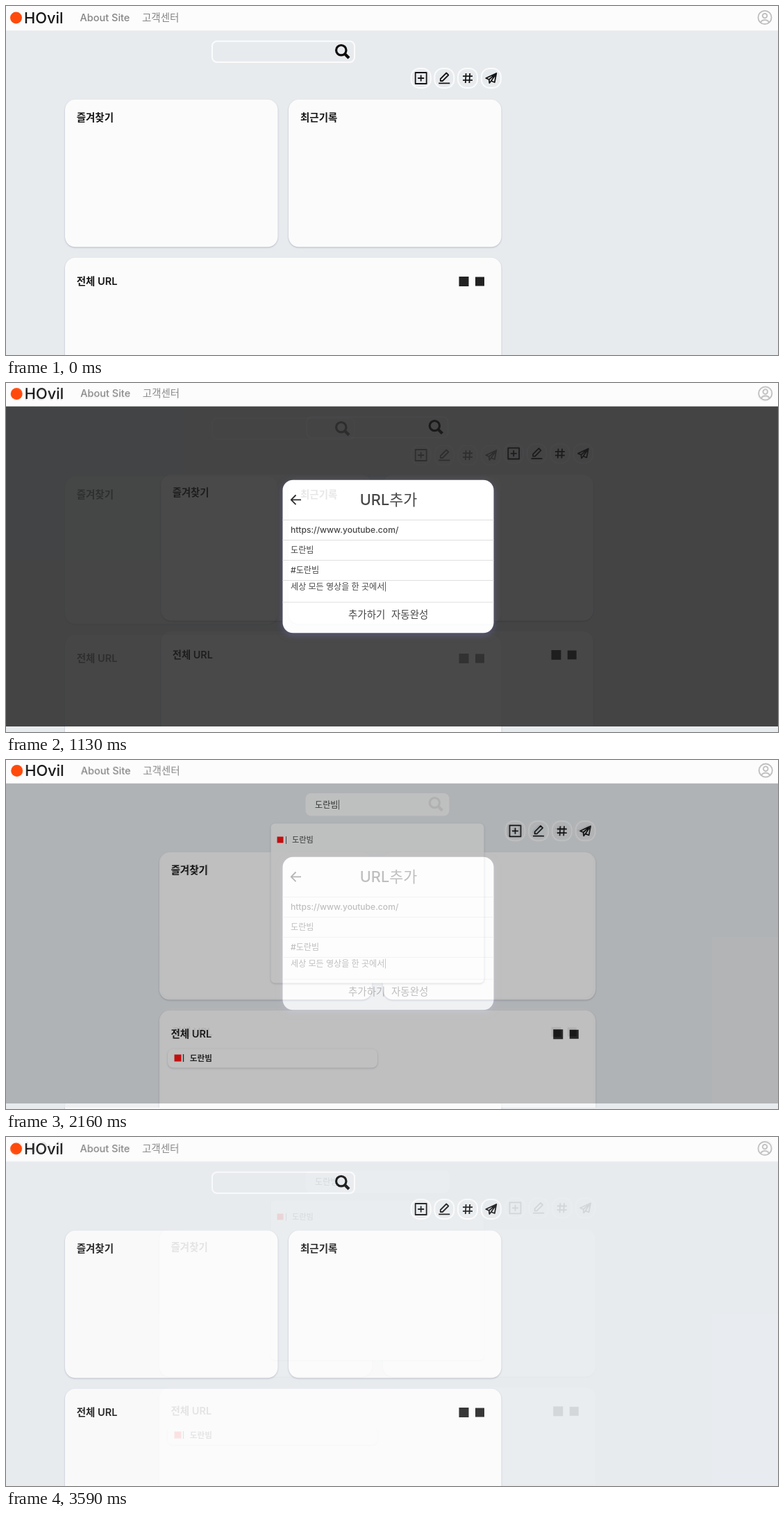
Write an HTML page that moves like this. It is 1112 px wide and 503 px high and loops after 3.69 s.

```html
<!DOCTYPE html>
<html lang="ko">
<head>
<meta charset="utf-8">
<title>URL board</title>
<style>
  html, body { margin: 0; height: 100%; overflow: hidden; background: #e8ebee; }
  svg { display: block; }
  .stage { width: 100vw; height: 100vh; }
  text { font: 500 14.5px Inter, "Noto Sans CJK KR", "Noto Sans CJK JP", sans-serif; fill: #333; }
  .nav { fill: #868686; }
  .logo { font-size: 21.8px; fill: #161616; }
  .head { font-weight: 600; fill: #151515; }
  .title { font-size: 21.8px; }
  .field { font-size: 12.1px; }
  .item { font-size: 11.7px; font-weight: 600; fill: #222; }
  .hint { font-size: 11.2px; }
  .line { fill: none; stroke: #151515; stroke-width: 1.8; stroke-linejoin: round; }
  .user { fill: none; stroke: #bdbdbd; stroke-width: 1.8; }
  .ring { fill: none; stroke: #fbfbfb; stroke-width: 2; }
  .rule { stroke: #dcdcdc; }
  .caret { stroke: #555; }
  .card { fill: #fbfbfb; filter: drop-shadow(0 1.6px 1px rgba(80, 90, 120, .35)); }
  .drop { fill: #fdfdfd; filter: drop-shadow(0 1px 1.5px rgba(80, 90, 120, .3)); }
  .modal { fill: #fff; filter: drop-shadow(0 3px 5px rgba(90, 90, 165, .5)); }

  /* Each slide holds 330 ms, then blends in ten 100 ms steps. */
  .form { animation: form 3690ms infinite; }
  .results { animation: results 3690ms infinite; }
  @keyframes form {
    0% { opacity: 0; animation-timing-function: step-end; }
    8.92% { opacity: 0; animation-timing-function: steps(10, start); }
    36.02% { opacity: 1; animation-timing-function: step-end; }
    70%, 100% { opacity: 0; animation-timing-function: step-end; }
  }
  @keyframes results {
    0% { opacity: 0; animation-timing-function: step-end; }
    42.26% { opacity: 0; animation-timing-function: steps(10, start); }
    69.36% { opacity: 1; animation-timing-function: step-end; }
    75.59% { opacity: 1; animation-timing-function: steps(9, start); }
    100% { opacity: .1; }
  }
</style>
</head>
<body>
<svg class="stage" viewBox="0 0 1112 503">
  <defs>
    <g id="nav">
      <rect x="-5" y="-5" width="1125" height="40.3" fill="#fcfcfc"/>
      <circle cx="14.5" cy="17" r="8.5" fill="#ff4a0c"/>
      <text class="logo" x="26" y="24.5">HOvil</text>
      <text class="nav" x="106.5" y="22">About Site</text>
      <text class="nav" x="196" y="22">고객센터</text>
      <g class="user" transform="translate(1093 16.5)">
        <circle r="9.6"/>
        <circle cy="-2.4" r="3.3"/>
        <path d="M-6 7.2Q-4.5 3.6 0 3.6T6 7.2"/>
      </g>
    </g>

    <g id="search">
      <rect class="ring" x="297" y="50.7" width="205" height="30.3" rx="7"/>
      <g fill="none" stroke="#0c0c0c">
        <circle cx="482.8" cy="63.7" r="7.2" stroke-width="3.2"/>
        <path d="M488 69l6 6" stroke-width="4.2"/>
      </g>
    </g>

    <rect id="ring" class="ring" x="-14" y="-14" width="28" height="28" rx="12"/>

    <g id="board">
      <g transform="translate(597.7 104)">
        <use href="#ring"/>
        <path class="line" d="M-8-8H8V8H-8ZM0-4.5V4.5M-4.5 0H4.5"/>
      </g>
      <g transform="translate(631.3 104)">
        <use href="#ring"/>
        <path class="line" d="M-5.5 4V1L3-7.5L6-4.5L-2.5 4ZM-8 7.3H8"/>
      </g>
      <g transform="translate(665 104)">
        <use href="#ring"/>
        <path class="line" d="M-2.4-7L-3.2 7M3.2-7L2.4 7M-7-2.8H7M-7 2.8H7"/>
      </g>
      <g transform="translate(698.8 104)">
        <use href="#ring"/>
        <path class="line" d="M7.5-7L-7.5 0L-3 2L-2.5 7L0 4L5 6ZM7.5-7L-3 2M7.5-7L0 4"/>
      </g>
      <rect class="card" x="85" y="134.8" width="306.5" height="212.5" rx="15"/>
      <rect class="card" x="407" y="134.8" width="306.5" height="212.5" rx="15"/>
      <rect class="card" x="85" y="362.7" width="628.5" height="212" rx="15"/>
      <text class="head" x="101.7" y="166">즐겨찾기</text>
      <text class="head" x="424" y="166">최근기록</text>
      <text class="head" x="101.7" y="402">전체 URL</text>
      <rect x="652.5" y="390" width="14" height="14" fill="#222"/>
      <rect x="676" y="390.5" width="13" height="13" fill="#222"/>
    </g>
  </defs>

  <g>
    <rect width="1112" height="503" fill="#e8ebee"/>
    <use href="#nav"/>
    <use href="#search"/>
    <use href="#board"/>
  </g>

  <g class="form">
    <svg width="1112" height="494.5">
      <rect width="1112" height="503" fill="#e8ebee"/>
      <g transform="translate(138.9 -1.5) scale(.991)">
        <use href="#search"/>
        <use href="#board"/>
      </g>
      <rect width="1112" height="503" fill="#000" opacity=".79"/>
      <use href="#nav" transform="translate(.8 -1.6)"/>
      <rect class="modal" x="398.5" y="139.7" width="304" height="220.6" rx="15"/>
      <path class="line" d="M425 168.3H411M417.5 161.5L410.7 168.3L417.5 175.1"/>
      <text class="title" x="551" y="176" text-anchor="middle">URL추가</text>
      <path class="rule" d="M398.5 197.5h304m-304 29h304m-304 29h304m-304 29h304m-304 31.5h304"/>
      <text class="field" x="410" y="216.3">https://www.youtube.com/</text>
      <text class="field" x="410" y="244.8">도란빔</text>
      <text class="field" x="410" y="273.8">#도란빔</text>
      <text class="field" x="410" y="297.8">세상 모든 영상을 한 곳에서</text>
      <path class="caret" d="M546.5 286.5v14"/>
      <text x="493" y="339.3">추가하기</text>
      <text x="555" y="339.3">자동완성</text>
    </svg>
  </g>

  <g class="results">
    <svg width="1112" height="501">
      <rect width="1112" height="503" fill="#e8ebee"/>
      <use href="#nav" transform="translate(1.4 -1.4)"/>
      <use href="#board" transform="translate(135.8 -1.7)"/>
      <rect x="431.5" y="48" width="207" height="32.5" rx="8" fill="#fdfdfd"/>
      <text class="field" x="445" y="69">도란빔</text>
      <path class="caret" d="M479.5 57.5v14"/>
      <rect class="drop" x="381.5" y="91.5" width="307" height="230" rx="6"/>
      <rect x="390.5" y="110.5" width="9" height="9" fill="#f00"/>
      <path class="caret" d="M403.5 110v11"/>
      <text class="hint" x="412" y="119.3">도란빔</text>
      <rect class="drop" x="233" y="416.5" width="302" height="27" rx="8"/>
      <rect x="242.5" y="424.5" width="10" height="10" fill="#f00"/>
      <path d="M255.5 424v11" stroke="#222" stroke-width="1.3"/>
      <text class="item" x="264.7" y="433.8">도란빔</text>
    </svg>
  </g>
</svg>
</body>
</html>
```
